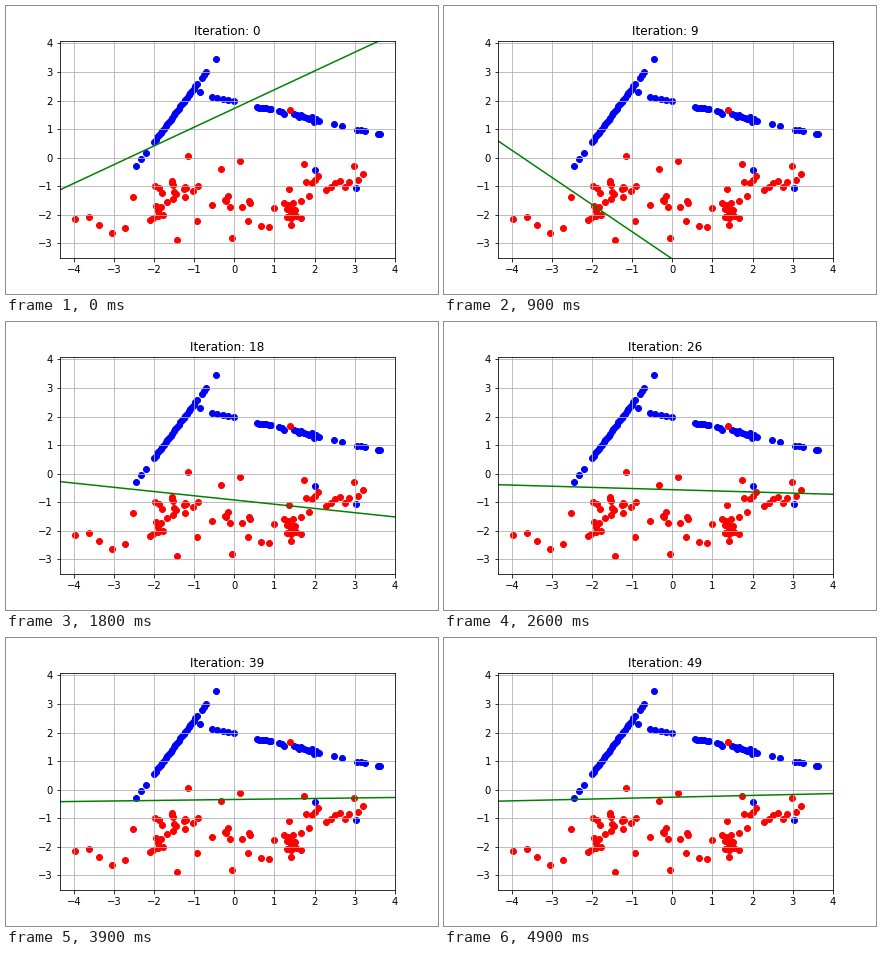
A matplotlib script for the animation above (5000 ms loop, 432 by 288 pixels).

```python
import numpy as np
import matplotlib.pyplot as plt
from matplotlib.animation import FuncAnimation

FRAMES, INTERVAL = 50, 100
XLIM, YLIM = (-4.348, 4.001), (-3.511, 4.10)
LEFT, RIGHT, BOTTOM, TOP = 54, 388.8, 252, 34.56

plt.rcParams["font.family"] = "DejaVu Sans"
rng = np.random.default_rng(4)


# Clusters are laid out in stage pixels, y downwards
def runs(*segments):
    return np.concatenate([np.linspace(*segment) for segment in segments])


def along(x, x0, y0, slope, jitter=0):
    return np.column_stack([x, y0 + slope * (x - x0) + rng.normal(0, jitter, len(x))])


def blob(center, spread, count):
    return rng.normal(center, spread, (count, 2))


def to_data(points):
    x, y = np.asarray(points, float).T
    return (np.interp(x, (LEFT, RIGHT), XLIM),
            np.interp(y, (TOP, BOTTOM), YLIM[::-1]))


def boundary(step):
    """Solve 1 + u*x + v*y = 0 at both plot edges, with weights eased over time."""
    u = 0.380 - 0.0125 * step + 9.5e-7 * step ** 3
    v = -0.580 + step * (0.089 + 0.0129 * np.exp(-step / 14))
    return -(1 + u * np.array(XLIM)) / v


blue = np.vstack([
    along(runs((130, 140, 3), (148, 191, 27), (196, 200, 3), (210, 210, 1)),
          130, 160, -1.34),
    along(runs((206, 228, 5), (251, 265, 7), (273, 278, 3)), 206, 90.5, 0.225, 0.5),
    along(runs((288, 313, 11)), 206, 90.5, 0.225, 1.5),
    along(runs((328, 336, 2), (351, 359, 3), (372, 374, 2)), 206, 90.5, 0.225, 0.5),
    [(194, 86), (309, 164), (350, 182)],
])
red = np.vstack([
    # Stragglers around the left cluster, and one inside the blue curve
    [(69, 213), (83, 211), (93, 219), (106, 227), (119, 222), (127, 191),
     (171, 234), (226, 232), (255, 220), (182, 150), (215, 163), (234, 155),
     (284, 104)],
    blob((168, 187), (10, 7), 17),
    blob((145, 208), (9, 6), 6),
    blob((222, 193), (18, 13), 11),
    blob((286, 204), (7, 8), 15),
    along(runs((283, 298, 2), (300, 312, 5), (320, 357, 9)), 298, 179, -0.2, 7),
])

fig, ax = plt.subplots(figsize=(6, 4), dpi=72)
fig.subplots_adjust(left=0.125, right=0.9, bottom=0.125, top=0.88)
ax.scatter(*to_data(blue), color="blue")
ax.scatter(*to_data(red), color="red")
line, = ax.plot(XLIM, boundary(0), color="green")
title = ax.set_title("Iteration: 0")
ax.set(xlim=XLIM, ylim=YLIM, xticks=range(-4, 5), yticks=range(-3, 5))
ax.grid(True)


def update(step):
    line.set_ydata(boundary(step))
    title.set_text(f"Iteration: {step}")
    return line, title


anim = FuncAnimation(fig, update, frames=FRAMES, interval=INTERVAL,
                     repeat=True, repeat_delay=0)
plt.show()
```
